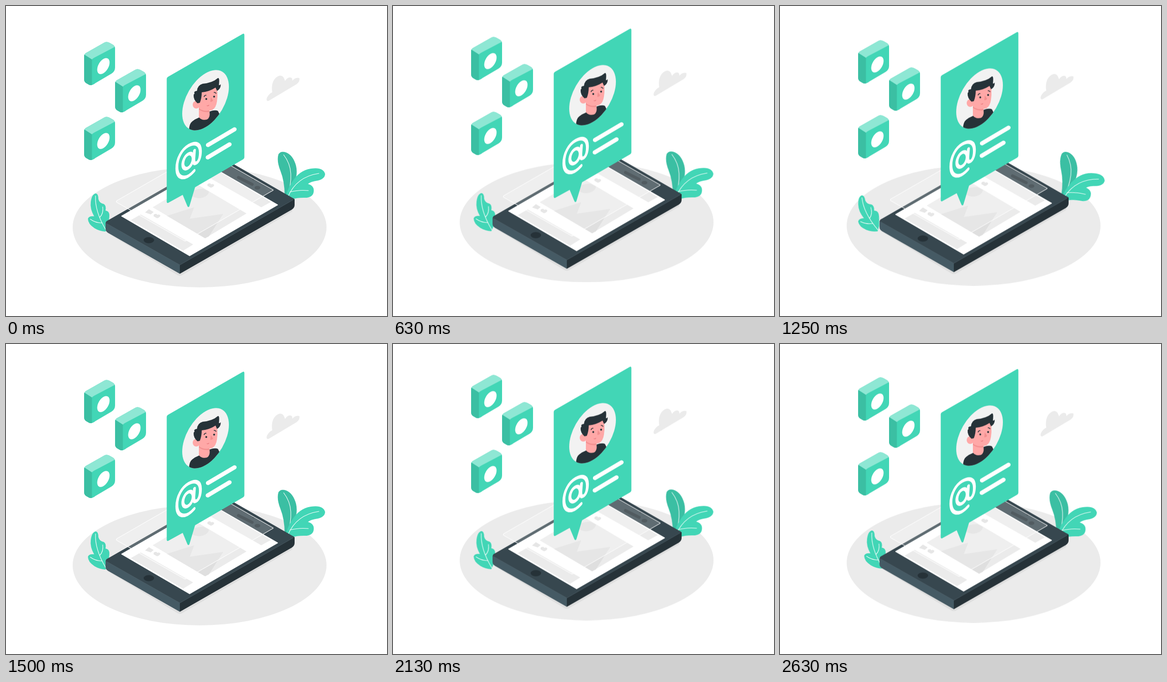
An HTML page that plays this animation: 800x650 px, repeating every 2.68 s.

```html
<!DOCTYPE html>
<html lang="en">
<head>
<meta charset="utf-8">
<title>Profile card over phone</title>
<style>
  html, body { margin: 0; width: 100%; height: 100%; overflow: hidden; background: #fff; }
  svg { display: block; width: 800px; height: 650px; }

  .float { animation: float 2680ms linear infinite; }
  .sway { animation: sway 2680ms ease-in-out infinite; }
  .right { transform-origin: 590px 403px; --dip: 1.2px; }
  .left { transform-origin: 210px 470px; --dip: -2px; }

  @keyframes float {
    0% { transform: translateY(0); }
    27.24%, 83.21% { transform: translateY(-12.15px); }
    55.22% { transform: translateY(.35px); }
    100% { transform: translateY(-4.65px); }
  }
  @keyframes sway {
    0%, 56% { transform: translate(0, 0) rotate(0deg); }
    6.34%, 49.25%, 62.3% { transform: translate(8px, 0) rotate(13deg); }
    29.5%, 85.4% { transform: translate(6px, 0) rotate(12deg); }
    12.3%, 68.3% { transform: translate(1.3px, -.3px) rotate(0deg); }
    23.5%, 79.5% { transform: translate(2.6px, -.7px) rotate(0deg); }
    35.8%, 42.2%, 91.8%, 98.1% { transform: translate(-4.7px, var(--dip)) rotate(0deg); }
    100% { transform: translate(-4.4px, var(--dip)) rotate(0deg); }
  }

  .mint { fill: #42d6b6; }
  .deep { fill: #3bbfa3; }
  .pale { fill: #8ee7d4; }
  .ink { fill: #263238; }
  .skin { fill: #ffa8a7; }
  .blush { fill: #f28f8f; }
  .line { fill: none; stroke: #fff; stroke-linecap: round; stroke-linejoin: round; }
  .vein { stroke-width: 1.1; }
</style>
</head>
<body>
<svg viewBox="0 0 800 650">
  <defs>
    <clipPath id="round"><circle r="56.6" transform="matrix(.866 -.5 0 1 419 197.5)"/></clipPath>
    <clipPath id="box">
      <path d="M164 105Q164 101 168 98.500L206 77Q212 74 218 77.500L225 81.500Q229 84 229 89V129Q229 137 222 141.500L188 161.500Q180 168 174 165L168 161.500Q164 159 164 153Z"/>
    </clipPath>
    <g id="tile">
      <g clip-path="url(#box)">
        <path class="mint" d="M160 70H235V170H160Z"/>
        <path class="deep" d="M160 99L180.500 112V170H160Z"/>
        <path class="pale" d="M160 99L180.500 112Q182 110 186 108L226 87Q229 85 230 84V70H160Z"/>
      </g>
      <circle r="15" fill="#fff" transform="matrix(.866 -.5 0 1 204.500 126)"/>
    </g>
    <path id="heart" d="M0 5L-7 1Q-8-4-3-4Q0-5 0-2Q5-4 7-1Q7 3 0 5Z"/>
  </defs>

  <ellipse class="float" cx="406.500" cy="464" rx="266.500" ry="126" fill="#ebebeb"/>

  <g class="sway right">
    <path class="deep" d="M585 403Q586 370 576 345Q568 325 572 311Q577 303 588 307Q603 313 609 335Q613 352 606 370L596 394Z"/>
    <path class="line vein" d="M583 312Q597 330 598 352Q599 375 592 392"/>
    <path class="mint" d="M587 403Q590 385 600 370Q615 345 640 341Q666 337 670 352Q670 362 655 366Q640 368 634 373Q648 377 646 390Q644 403 625 402Q610 402 602 405Z"/>
    <path class="line vein" d="M592 400Q610 358 657 351M596 390Q615 385 635 387"/>
  </g>

  <!-- the left plant sways as a mirror image of the right one -->
  <g transform="translate(420 0) scale(-1 1)">
    <g class="sway left">
      <g transform="translate(420 0) scale(-1 1)">
        <path class="mint" d="M209 473Q196 472 186 466Q172 457 172 446Q174 440 185 441Q176 425 178 411Q180 395 188 393Q194 393 194 405Q196 413 205 415Q211 418 209 429Q218 430 217 442Q216 450 214 462Z"/>
        <path class="line vein" d="M188 398Q186 430 210 470M203 421Q205 435 197 443M177 447Q188 455 202 455"/>
      </g>
    </g>
  </g>

  <g class="float">
    <!-- phone -->
    <path fill="#dedede" d="M211 475L358 563Q365 568 372 563L601 431V420L365 550Z"/>
    <path fill="#455a64" d="M209 454V467Q209 472.500 214 475.500L365 561.500V542L214 454Z"/>
    <path class="ink" d="M365 542V561.500L600 427Q606 423 606 417V405L600 403Z"/>
    <path fill="#37474f" d="M213 457Q206 453.500 214 449.500L449 315L601 402Q609 405 601 407.500L365 543Z"/>
    <path fill="none" stroke="#53656e" stroke-width=".7" d="M213 457L365 543L602 407"/>
    <ellipse class="ink" cx="300" cy="491" rx="11" ry="6.500"/>
    <path fill="none" stroke="#263238" stroke-width="6" stroke-linecap="round" d="M488 359.500L517 374"/>
    <ellipse class="ink" cx="528" cy="381" rx="6" ry="3.800"/>
    <circle class="ink" cx="519" cy="364" r="1.500"/>

    <!-- screen -->
    <path fill="#fff" stroke="#fff" stroke-width="2" stroke-linejoin="round" d="M243 440.500L427 334.500L570 417L385.500 523.500Z"/>
    <g fill="#ebebeb">
      <path d="M262 449L283 437L393 500L372 513Z"/>
      <path d="M425 359L446 346L556 411L536 422Z"/>
      <path d="M308 422L395 370L505 435L418 487Z"/>
    </g>
    <g fill="#dfdfdf">
      <path d="M338 440L395 422L386 446L456 436L426 483L418 487Z"/>
      <path d="M385 393Q395 383 414 383L426 389Q425 400 407 403Q392 403 385 393Z"/>
      <path d="M292 433L300 426L310 432L304 437Z"/>
      <use href="#heart" x="317" y="440"/>
      <use href="#heart" x="430" y="376"/>
    </g>

    <path d="M233 408L414 304Q416 303 418 304L560 385Q562 386 560 387L378 492Q376 493 374 492L233 412Q230 410 233 408Z" fill="#fff" fill-opacity=".2" stroke="#fff" stroke-opacity=".85" stroke-width="1.400"/>

    <!-- card -->
    <path class="mint" d="M337.500 153Q337.500 150 341 148L497 58.500Q500.500 57 500.500 61V317Q500.500 320 497 322L397 380L385 420Q383 423 381 420L371 396L341 412.500Q338 414 337.500 411Z"/>
    <g clip-path="url(#round)">
      <path fill="#f2f2f2" d="M360 125H480V270H360Z"/>
      <path class="ink" d="M384 265Q384 247 391 242Q397 237 405 234L428 221Q439 217 445 220L448 226V265Z"/>
      <path class="skin" d="M405 200V233Q411 241 422 238Q429 234 427.500 223V205Z"/>
      <path class="blush" d="M405 214Q414 222 427 219V222Q414 224 405 217Z"/>
      <path class="skin" d="M405 178L441 165Q446 180 443 200Q441 214 433 218Q421 222 407 214Z"/>
      <ellipse class="skin" cx="399.500" cy="207" rx="7.500" ry="8"/>
      <path class="ink" d="M407 203L402 204Q393 196 394 186Q397 183 395 181Q397 178 401 178Q402 166 413 163Q434 161 445 151Q449 150 447 166Q450 166 451 164Q451 174 443 178L440 171Q426 180 411 181Q411 193 407 203Z"/>
      <circle class="ink" cx="420.500" cy="195" r="2"/>
      <circle class="ink" cx="437" cy="190" r="2"/>
      <path fill="none" stroke="#263238" stroke-width="1.700" stroke-linecap="round" d="M416 190Q417 187 420 187M437 181Q439 181 441 183"/>
      <path class="blush" d="M430 191L435 198Q433 201 429 201Z"/>
      <path fill="none" stroke="#e8787c" stroke-width="1.200" stroke-linecap="round" d="M422 209Q424 210 426 208"/>
    </g>
    <g class="line" transform="matrix(.866 -.5 0 1 383.500 324.500)" stroke-width="7">
      <path d="M13 28C-7 38-28.500 25-28.500 0C-28.500-20-16-32-1-32C17-32 28.500-21 28.500-5C28.500 7 25 14 19 14C13 14 12 9 12.500 3L14-14"/>
      <ellipse cx="-1.500" cy="0" rx="12.500" ry="14.500"/>
    </g>
    <path class="line" stroke-width="8.500" d="M424 291.500L480 258.500M423.500 317.500L469.500 290"/>

    <!-- tiles and cloud -->
    <use href="#tile"/>
    <use href="#tile" x="65" y="57"/>
    <use href="#tile" y="157"/>
    <path fill="#ebebeb" d="M549 199Q546 198 548 192Q552 184 559 181Q556 160 567 150Q577 142 583 150L586 157Q593 147 600 151Q602 155 601 157Q608 149 616 151Q618 158 610 164L553 198Q550 200 549 199Z"/>
  </g>
</svg>
</body>
</html>
```
